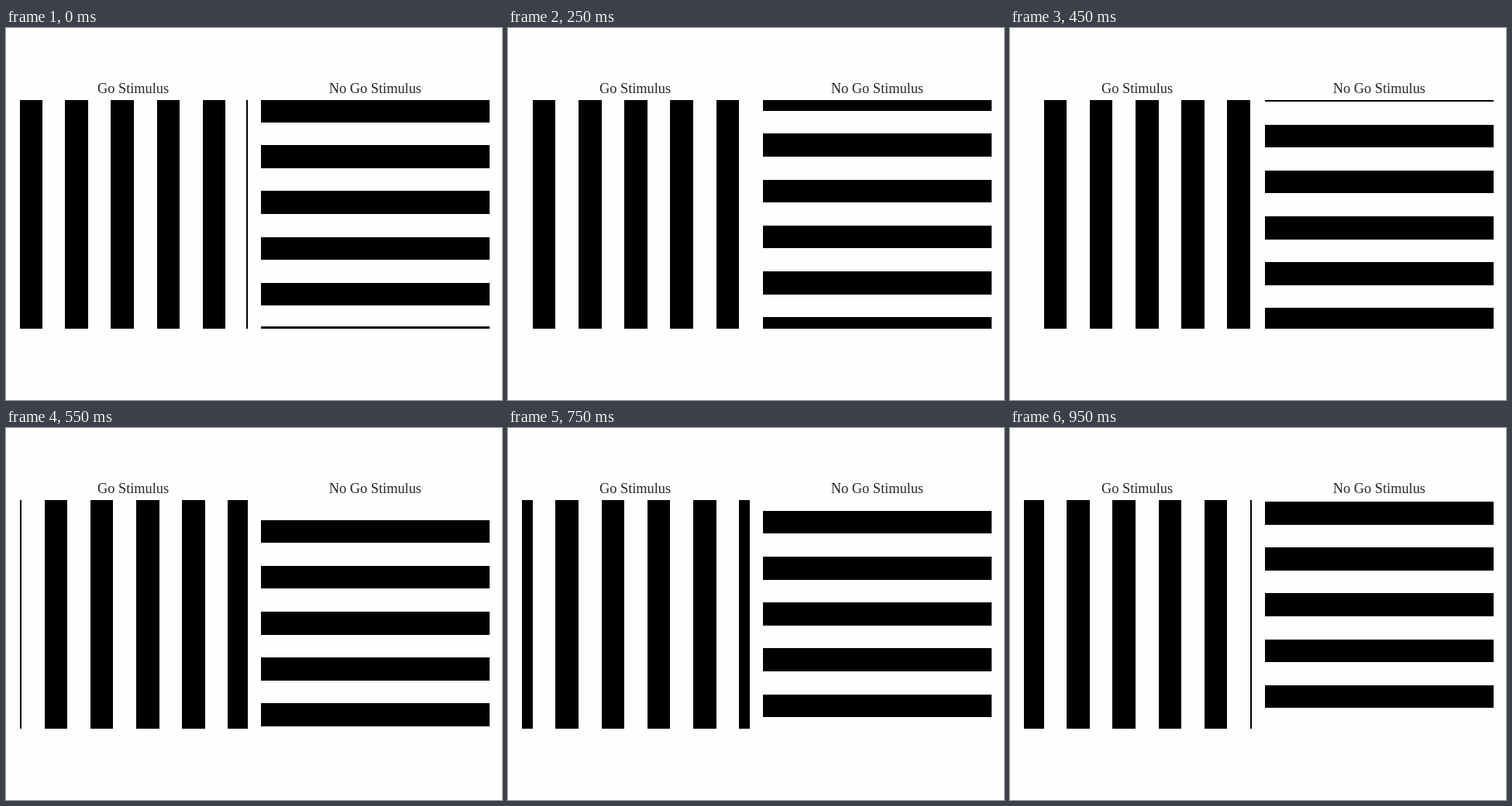
Write an HTML page that moves like this. It is 640x480 px and loops after 1000 ms.

```html
<!DOCTYPE html>
<html lang="en">
<head>
<meta charset="utf-8">
<title>Go / No Go gratings</title>
<style>
  html, body { margin: 0; width: 100%; height: 100%; overflow: hidden; background: #fefefe; }
  svg { display: block; width: 640px; height: 480px; }
  text { font: 18.33px "Liberation Serif", "Times New Roman", serif; fill: #262626; }
  path { fill: #000; shape-rendering: crispEdges; }
</style>
</head>
<body>
<svg viewBox="0 0 640 480">
  <text x="118" y="84">Go Stimulus</text>
  <text x="416.8" y="84">No Go Stimulus</text>
  <path id="go"/>
  <path id="nogo"/>
</svg>
<script>
  const STEPS = 20, STEP_MS = 50, CELL = 2.96;
  const go = document.getElementById('go');
  const nogo = document.getElementById('nogo');

  // Each wave has 100 samples over five periods, so one step is 0.99 samples.
  const edge = (m, origin, lo, hi) => {
    const pos = Math.round(origin + CELL * Math.ceil(m * 99 / 100));
    return Math.min(hi, Math.max(lo, pos));
  };

  function bars(shift, origin, lo, hi, rect) {
    let d = '';
    for (let m = shift - STEPS; m <= 100; m += STEPS) {
      const a = edge(m, origin, lo, hi);
      const b = edge(m + STEPS / 2, origin, lo, hi);
      if (b > a) d += rect(a, b);
    }
    return d;
  }

  const column = (a, b) => `M${a} 93H${b}V388H${a}Z`;
  const row = (a, b) => `M329 ${a}H624V${b}H329Z`;

  let shown = -1;
  function draw(k) {
    if (k === shown) return;
    shown = k;
    go.setAttribute('d', bars(k, 16.95, 18, 312, column));
    nogo.setAttribute('d', bars((STEPS - k) % STEPS, 92, 93, 388, row));
  }

  const start = performance.now();
  function tick() {
    draw(Math.floor((performance.now() - start) / STEP_MS) % STEPS);
    requestAnimationFrame(tick);
  }
  tick();
</script>
</body>
</html>
```
